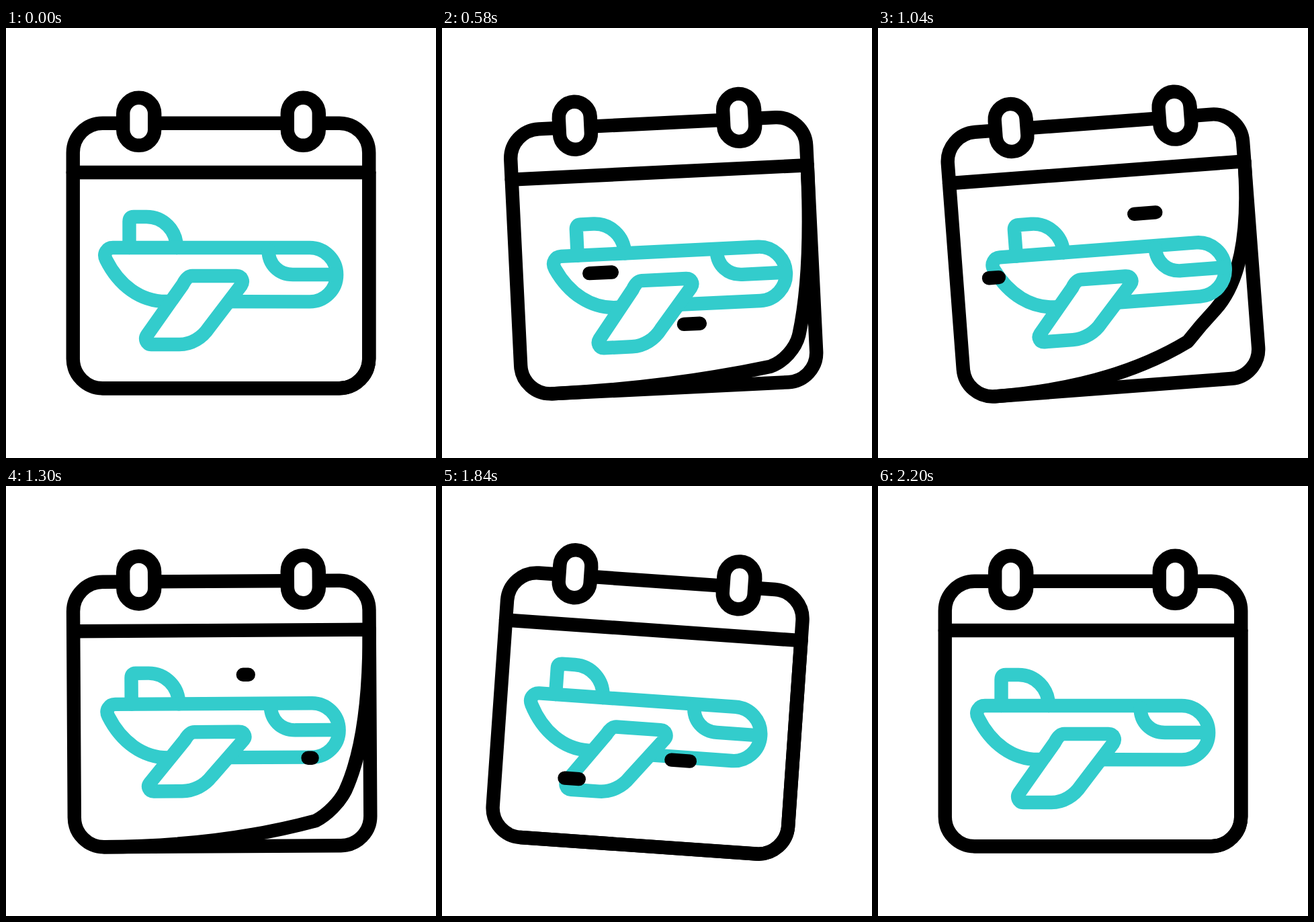
An HTML page for the animation above (2400 ms loop, 640x640 px).

```html
<!DOCTYPE html>
<html lang="en">
<head>
<meta charset="utf-8">
<title>Travel calendar</title>
<style>
  html, body { margin: 0; height: 100%; overflow: hidden; background: #fff; }
  svg { display: block; width: 100%; height: 100%; }
  g { fill: none; stroke: #000; stroke-width: 20.4; stroke-linecap: round; stroke-linejoin: round; }
  #plane { stroke: #33cccc; }
  .paper { fill: #fff; }
</style>
</head>
<body>
<svg viewBox="0 0 640 640">
  <g id="calendar">
    <rect x="99.75" y="141.75" width="440.5" height="394.5" rx="44"/>
    <path id="page"/>
    <path d="M99.75 215H540.25"/>
    <rect class="paper" x="174.2" y="103.8" width="47" height="71" rx="23.5"/>
    <rect class="paper" x="418.8" y="103.8" width="47" height="71" rx="23.5"/>
    <g id="plane">
      <path d="M183.5 327V288Q183.5 281 190 281H209C234 281 254 301 254 327"/>
      <path d="M238 407C200 407 168 383 149 345C144 335 151 327 159 327H452A40.2 40.2 0 0 1 452 407.4Z"/>
      <path d="M390.5 330C390.5 352 406 367 427 367H490"/>
      <path id="wing" class="paper"/>
    </g>
    <g id="wind"></g>
  </g>
</svg>
<script>
const $ = id => document.getElementById(id);
const clamp = v => Math.min(1, Math.max(0, v));
const smooth = s => s * s * (3 - 2 * s);

// Eased value at u between [time, value] keys
function at(u, keys) {
  let v = keys[0][1];
  for (let i = 1; i < keys.length; i++) {
    const [a, from] = keys[i - 1], [b, to] = keys[i];
    if (u >= a) v = from + (to - from) * smooth(clamp((u - a) / (b - a)));
  }
  return v;
}

const tilt = [[0, 0], [.353, -5], [.76, 4.8], [.99, 0]];
const driftX = [[0, 0], [.27, 11], [.74, -2.8], [1, 0]];
const driftY = [[0, 0], [.27, 7.3], [.74, -8.8], [1, 0]];
const wingLift = [[0, 0], [.5, 14.5], [1, 0]];
const curl = [[0, 0], [.43, 60], [.716, 0]];

// Wind streaks: y, first x, last x, start, end
const streaks = [
  [442.5, 383.5, 327.5, .0385, .355],
  [360, 242, 148, .10, .46],
  [281, 427, 352, .25, .574],
  [405.5, 454, 360, .534, .894],
  [443.5, 247.5, 197.5, .626, .94]
];

function pagePath(d) {
  const e = d / 50, x1 = 540.25 - d, y1 = 492 - d, x2 = 496 - d, y2 = 536.25 - d;
  return `M540.25 215Q540.25 375 ${x1} ${y1}` +
    `C${x1 - 12 * e} ${y1 + 24 - 9 * e} ${x2 + 24 - 9 * e} ${y2 - 12 * e} ${x2} ${y2}` +
    `Q318 536.25 144 536.25`;
}

function wingPath(lift) {
  const y = v => 369 + (v - 369) * (1 - lift / 102);
  return `M277 369H343C351 369 354 ${y(377)} 350 ${y(383)}L302 ${y(446)}` +
    `C292 ${y(461)} 276 ${y(471)} 258 ${y(471)}H216C209 ${y(471)} 206 ${y(463)} 210 ${y(457)}` +
    `L263 ${y(382)}C267 ${y(374)} 271 369 277 369Z`;
}

function streakPath(u, [y, from, to, start, end]) {
  const p = (u - start) / (end - start);
  if (p <= 0 || p >= 1) return '';
  const x = s => from + (to - from) * clamp(s / .7);
  return `M${x(p - .3)} ${y}H${x(p)}`;
}

const lines = streaks.map(() =>
  $('wind').appendChild(document.createElementNS('http://www.w3.org/2000/svg', 'path')));

function draw(now) {
  const t = Math.floor(now % 2400 / 20) * 20;
  const u = clamp((t - 200) / 2000);
  $('calendar').setAttribute('transform', `rotate(${at(u, tilt)} 320 139.2)`);
  $('plane').setAttribute('transform', `translate(${at(u, driftX)} ${at(u, driftY)})`);
  $('page').setAttribute('d', pagePath(at(u, curl)));
  $('wing').setAttribute('d', wingPath(at(u, wingLift)));
  lines.forEach((line, i) => line.setAttribute('d', streakPath(u, streaks[i])));
}

const begin = performance.now();
function tick() {
  draw(performance.now() - begin);
  requestAnimationFrame(tick);
}
tick();
</script>
</body>
</html>
```
